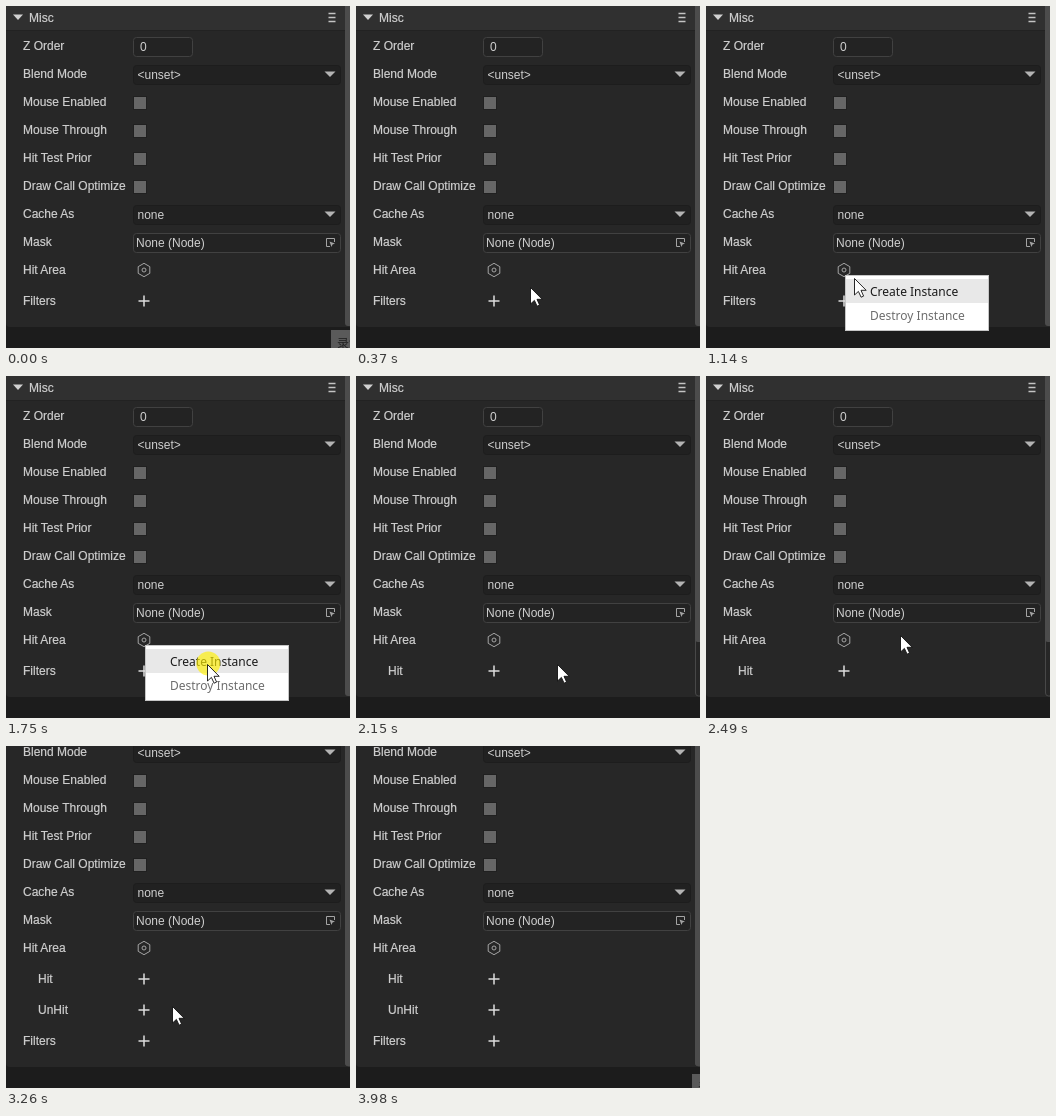
Recreate the animation shown at these times as an HTML page. Size 344x342 px, loop 4040 ms.

```html
<!DOCTYPE html>
<html lang="en">
<head>
<meta charset="utf-8">
<title>Hit area inspector</title>
<style>
  html, body { margin: 0; width: 100%; height: 100%; overflow: hidden; background: #1c1c1c; }
  svg { display: block; width: 344px; height: 342px; }
  text { font: 12px "Liberation Sans", Arial, sans-serif; fill: #cfcfcf; white-space: pre; }
  .label { stroke: #cfcfcf; stroke-width: .2; }
  .input { fill: #232323; stroke: #414141; }
  .select { fill: #212121; stroke: #1d1d1d; }
  .check { fill: #666; stroke: #202020; }
  .line { fill: none; stroke: #a4a4a4; }
  .plus { stroke: #dedede; stroke-width: 1.5; }
  .menu text { font: 12px "Noto Sans", sans-serif; fill: #1b1b1b; }
  .menu .off { fill: #6d6d6d; }
  .tip text { font: 12px "Noto Sans CJK SC", "Noto Sans CJK", sans-serif; fill: #222; }
</style>
</head>
<body>
<svg viewBox="0 0 344 342">
  <defs>
    <clipPath id="panel"><rect width="339" height="319"/></clipPath>
  </defs>
  <rect width="344" height="342" fill="#1c1c1c"/>
  <path d="M0 0H344V321H4Q0 321 0 317Z" fill="#272727"/>
  <g clip-path="url(#panel)">
    <g id="content">
      <rect width="339" height="24" fill="#303030"/>
      <path d="M0 24.5H339" stroke="#222"/>
      <path d="M7 8.5H17L12 14Z" fill="#d0d0d0"/>
      <text class="label" x="23" y="16">Misc</text>
      <path d="M322.5 7.5H329.5M322.5 11.5H329.5M322.5 15.5H329.5" stroke="#c4c4c4" stroke-width="1.4"/>
      <g id="rows"></g>
      <g id="plain"></g>
      <g id="expanded"></g>
    </g>
  </g>
  <rect id="track" x="339.5" y="-4" width="8" height="324" rx="3" fill="#272727" stroke="#484848"/>
  <rect id="thumb" x="339" y="-100" width="9" rx="3" fill="#4c4c4c"/>
  <g id="menu" class="menu">
    <rect x="139.5" y="269.5" width="143" height="55" fill="#fff" stroke="#c6c6c6"/>
    <rect x="140" y="273" width="142" height="24" fill="#e8e8e8"/>
    <text x="164" y="290">Create Instance</text>
    <text x="164" y="314" class="off">Destroy Instance</text>
  </g>
  <g id="tip" class="tip">
    <rect width="60" height="40" fill="#5a5a5a"/>
    <text x="6" y="18">录制</text>
  </g>
  <g id="pointer">
    <circle id="press" r="12" cx=".3" cy="-.5" fill="#fff000" fill-opacity=".65"/>
    <path d="M-.5 .5V17L3.4 13.4L6.1 19.2L8.6 18.1L6 12.3H11.2Z" fill="#fff" stroke="#111" stroke-width=".9"/>
  </g>
</svg>
<script>
const LOOP = 4040, STEP = LOOP / 60;
const SCROLL = 62, THUMB_TRAVEL = 54, TRACK_END = 320;
const $ = id => document.getElementById(id);

// Row parts
const text = (x, y, s, cls = '') => `<text class="${cls}" x="${x}" y="${y}">${s}</text>`;
const label = (y, s, x = 17) => text(x, y + 4, s, 'label');
const field = (y, w, s, x, cls = 'input') =>
  `<rect class="${cls}" x="127.5" y="${y - 8.5}" width="${w}" height="19" rx="3"/>` + text(x, y + 5, s);
const select = (y, s) => field(y, 207, s, 131.5, 'select') +
  `<path d="M318.5 ${y - 2.5}H329.5L324 ${y + 3}Z" fill="#b4b4b4"/>`;
const check = y => `<rect class="check" x="127.5" y="${y - 5.5}" width="13" height="13"/>`;
const plus = y => `<path class="plus" d="M132.5 ${y}H143.5M138 ${y - 5.5}V${y + 5.5}"/>`;
const picker = y => `<path class="line" d="M324 ${y + 4.5}H320.5V${y - 3.5}H328.5V${y}"/>
  <path fill="#a4a4a4" d="M323.5 ${y - .5}L329 ${y + 1.5}L326.5 ${y + 2.5}L325.5 ${y + 5}Z"/>`;
const hexagon = (x, y, r) => {
  const points = Array.from({ length: 6 }, (_, i) => {
    const a = Math.PI * (i / 3 + .5);
    return `${x + r * Math.cos(a)},${y + r * Math.sin(a)}`;
  });
  return `<polygon class="line" points="${points.join(' ')}"/><circle class="line" cx="${x}" cy="${y}" r="2"/>`;
};
const plusRow = (y, s, x) => label(y, s, x) + plus(y);

const checks = ['Mouse Enabled', 'Mouse Through', 'Hit Test Prior', 'Draw Call Optimize'];
$('rows').innerHTML =
  label(40, 'Z Order') + field(40, 59, '0', 134) +
  label(68, 'Blend Mode') + select(68, '&lt;unset&gt;') +
  checks.map((s, i) => label(96 + 28 * i, s) + check(96 + 28 * i)).join('') +
  label(208, 'Cache As') + select(208, 'none') +
  label(236, 'Mask') + field(236, 207, 'None (Node)', 130) + picker(236) +
  label(264, 'Hit Area') +
  '<rect id="hover" x="127" y="253" width="22" height="22" rx="2" fill="#363636"/>' +
  hexagon(138, 264, 6.7);
$('plain').innerHTML = plusRow(295, 'Filters');
$('expanded').innerHTML = plusRow(295, 'Hit', 32) + plusRow(326, 'UnHit', 32) + plusRow(357, 'Filters');

// Pointer moves: the stops it eases towards, each with start and end time
const entry = { x: 340, y: 338 };
const stops = [
  { from: 0, to: 460, x: 139, y: 269 },
  { from: 990, to: 1340, x: 202, y: 288 },
  { from: 2150, to: 2490, x: 195, y: 259 },
  { from: 2490, to: 2630, x: 168, y: 248 },
  { from: 2900, to: 3260, x: 167, y: 260 },
  { from: 3800, to: 3990, x: 344, y: 340 }
];

const between = (t, a, b) => t >= a && t < b;
const ease = (t, a, b) => {
  const p = Math.min(1, Math.max(0, (t - a) / (b - a)));
  return p * p * (3 - 2 * p);
};
const pointerAt = t => stops.reduce(({ x, y }, s) => {
  const p = ease(t, s.from, s.to);
  return { x: x + (s.x - x) * p, y: y + (s.y - y) * p };
}, entry);

const show = (id, on) => $(id).style.display = on ? '' : 'none';
const move = (id, x, y) => $(id).setAttribute('transform', `translate(${Math.round(x)} ${Math.round(y)})`);

function draw(t) {
  const held = Math.floor(t / STEP + .05) * STEP;
  const expanded = t >= 1880;
  const scrolled = ease(held, 2640, 2820);
  const thumbEnd = TRACK_END - (expanded ? THUMB_TRAVEL * (1 - scrolled) : 0);

  move('content', 0, -SCROLL * scrolled);
  show('plain', !expanded);
  show('expanded', expanded);
  show('hover', between(t, 400, 940));
  show('menu', between(t, 940, 1880));
  show('track', expanded);
  $('thumb').setAttribute('height', thumbEnd + 100);

  show('tip', t < 70 || t >= 3980);
  if (t < 70) move('tip', 325, 324);
  else move('tip', 336, 328);

  const { x, y } = pointerAt(held);
  show('pointer', between(t, 70, 3980));
  move('pointer', x, y);
  show('press', between(t, 800, 1070) || between(t, 1750, 1880));
}

const start = performance.now();
function tick() {
  draw((performance.now() - start) % LOOP);
  requestAnimationFrame(tick);
}
tick();
</script>
</body>
</html>
```
